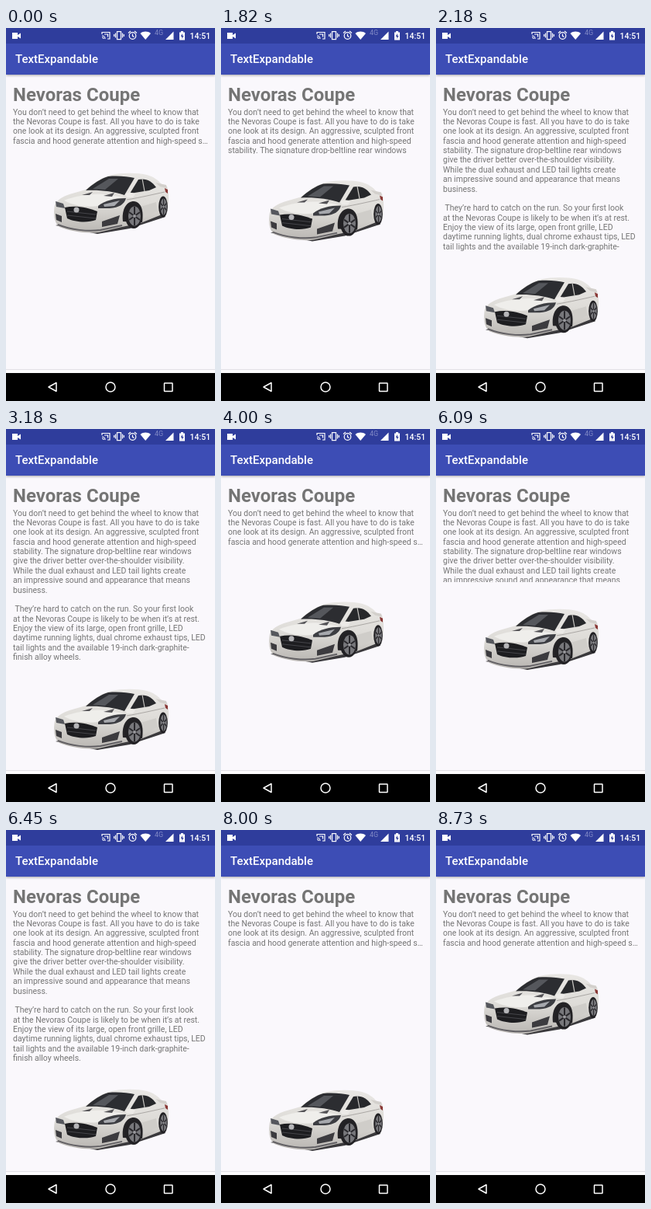
An HTML page for the animation above (8.82 s loop, 270 by 480 pixels).

```html
<!DOCTYPE html>
<html lang="en">
<head>
<meta charset="utf-8">
<title>TextExpandable</title>
<style>
@property --h {
  syntax: '<length>';
  inherits: true;
  initial-value: 50.5px;
}
html, body { margin: 0; width: 100%; height: 100%; overflow: hidden; }
body { background: #faf8fc; font-family: Roboto, sans-serif; }
#stage {
  position: relative; width: 270px; height: 480px; overflow: hidden;
  background: #faf8fc;
  animation: expand 8820ms cubic-bezier(.65, 0, .35, 1) infinite;
}
#stage > * { position: absolute; }
.bar { left: 0; top: 20px; width: 270px; height: 40px; background: #3d4db5; box-shadow: 0 1px 3px rgba(0, 0, 0, .35); }
.status { left: 0; top: 0; width: 270px; height: 20px; background: #2f3d9c; }
.app { left: 12px; top: 31px; color: #fff; font: 500 15px/18px Roboto, sans-serif; white-space: nowrap; }
h1 { margin: 0; left: 9px; top: 72px; color: #757575; font: 700 24px/28px Roboto, sans-serif; white-space: nowrap; }
.clip { left: 9px; top: 102px; width: 255px; height: var(--h); overflow: hidden; }
.clip pre {
  position: absolute; left: 0; top: .5px; margin: 0; color: #757575;
  font: 400 10.5px/12.37px Roboto, sans-serif;
}
.short { animation: short 8820ms step-end infinite; }
.full { animation: full 8820ms step-end infinite; }
.car { left: 0; top: 0; transform: translateY(calc(var(--h) - 50.5px)); }
.foot { left: 0; top: 439px; width: 270px; height: 5px; background: #fdfcfe; border-top: 1px solid #e3e1e6; box-sizing: border-box; }
.nav { left: 0; top: 444px; width: 270px; height: 36px; background: #000; }
.icons { left: 0; top: 0; }

/* 1640-2390 open, 3550-4300 close, 5770-6520 open, 8000-8750 close */
@keyframes expand {
  0%, 18.594% { --h: 50.5px; }
  27.098%, 40.249% { --h: 198.5px; }
  48.753%, 65.42% { --h: 49px; }
  73.923%, 90.703% { --h: 198.5px; }
  99.206%, 100% { --h: 49px; }
}
@keyframes short {
  0%, 40.249%, 90.703%, 100% { visibility: visible; }
  17.574%, 64.399% { visibility: hidden; }
}
@keyframes full {
  0%, 40.249%, 90.703%, 100% { visibility: hidden; }
  17.574%, 64.399% { visibility: visible; }
}
</style>
</head>
<body>
<div id="stage">
  <h1>Nevoras Coupe</h1>
  <div class="clip">
<pre class="short">You don’t need to get behind the wheel to know that
the Nevoras Coupe is fast. All you have to do is take
one look at its design. An aggressive, sculpted front
fascia and hood generate attention and high-speed s…</pre>
<pre class="full">You don’t need to get behind the wheel to know that
the Nevoras Coupe is fast. All you have to do is take
one look at its design. An aggressive, sculpted front
fascia and hood generate attention and high-speed
stability. The signature drop-beltline rear windows
give the driver better over-the-shoulder visibility.
While the dual exhaust and LED tail lights create
an impressive sound and appearance that means
business.

 They’re hard to catch on the run. So your first look
at the Nevoras Coupe is likely to be when it’s at rest.
Enjoy the view of its large, open front grille, LED
daytime running lights, dual chrome exhaust tips, LED
tail lights and the available 19-inch dark-graphite-
finish alloy wheels.</pre>
  </div>

  <svg class="car" width="270" height="300" viewBox="0 0 270 300">
    <defs>
      <linearGradient id="paint" x1="0" y1="0" x2="0" y2="1">
        <stop offset="0" stop-color="#e9e7e4"/>
        <stop offset=".5" stop-color="#dedcd8"/>
        <stop offset="1" stop-color="#b9b6b2"/>
      </linearGradient>
      <g id="wheel">
        <ellipse rx="11" ry="16" fill="#222124"/>
        <ellipse cx="1" rx="8" ry="12.5" fill="#77777b"/>
        <path d="M1-12V12M-6-5L8 5M-6 5L8-5" stroke="#29282c" stroke-width="2"/>
        <circle cx="1" r="2" fill="#99999d"/>
      </g>
    </defs>
    <path d="M64 254L118 265L160 258L206 243L200 236L100 245Z" fill="#3a393c"/>
    <path d="M63 228C66 221 73 217 82 214L103 208C114 199 124 192 136 189C150 186 170 186 182 189C190 191 197 196 201 201L208 204C211 213 211 226 207 236L199 241L174 251L150 256L120 263C102 265 82 261 69 256C62 251 61 238 63 228Z" fill="url(#paint)"/>
    <path d="M103 209C113 200 122 194 132 191C145 190 157 191 166 193L153 215C138 210 120 208 103 209Z" fill="#2c2d31"/>
    <path d="M112 207L133 194L145 194L128 208Z" fill="#55575c"/>
    <path d="M160 213L171 195C181 193 188 197 194 205L185 209Z" fill="#27282b"/>
    <path d="M176 194L179 210" stroke="#c9c7c3" stroke-width="1.2"/>
    <path d="M75 222C90 216 108 213 126 214L153 218C140 219 126 222 119 229C104 231 88 229 75 222Z" fill="#efeeeb"/>
    <path d="M98 215L112 211L108 215ZM126 216L140 212L137 217Z" fill="#535256"/>
    <path d="M156 221C174 218 191 214 205 211" fill="none" stroke="#aaa7a4"/>
    <path d="M174 230L194 224L195 236L176 245Z" fill="#cfcdc9"/>
    <path d="M154 214C157 211 164 211 167 214L164 218H156Z" fill="#eceae7"/>
    <path d="M64 223L74 226L76 232L65 230Z" fill="#55575d"/>
    <path d="M119 229C128 222 140 219 155 219C153 227 146 231 134 232L119 232Z" fill="#3c3d42"/>
    <path d="M126 227L147 222L140 229L127 230Z" fill="#a6a8ad"/>
    <path d="M76 231C90 228 106 231 118 236L116 247C106 251 89 250 79 245Z" fill="#1d1d20"/>
    <path d="M79 236L116 240M79 241L116 245" stroke="#45454a"/>
    <circle cx="91" cy="234" r="3.5" fill="#b5b5b8"/>
    <path d="M64 239L72 242L72 250L65 247ZM124 249L147 241L144 252L124 256Z" fill="#3c3b3f"/>
    <path d="M67 253C84 260 106 262 122 260L150 254" fill="none" stroke="#626064" stroke-width="2"/>
    <path d="M151 249C149 233 156 223 165 223C175 224 178 235 176 250Z" fill="#242326"/>
    <use href="#wheel" transform="translate(165 242)"/>
    <use href="#wheel" transform="translate(203 230) scale(.53 .85)"/>
    <path d="M193 199L207 202L208 206L199 204Z" fill="#d3d0cc"/>
    <path d="M205 206L209 208L209 213L206 211Z" fill="#8a3937"/>
  </svg>

  <div class="bar"></div>
  <div class="status"></div>
  <div class="app">TextExpandable</div>
  <div class="foot"></div>
  <div class="nav"></div>

  <svg class="icons" width="270" height="480" viewBox="0 0 270 480" fill="#fff">
    <path d="M8 6H15V9L19 6.5V13.5L15 11V14H8Z"/>
    <g fill="none" stroke="#fff" stroke-width="1.2">
      <path d="M124 8V5.500H134V14H131"/>
      <path d="M124 10A4 4 0 0 1 128 14M124 12A2 2 0 0 1 126 14"/>
      <path d="M127 8H131.500V11.500"/>
      <rect x="143.500" y="4.600" width="5" height="10"/>
      <path d="M141.500 6.500V12.500M150.500 6.500V12.500M139.700 8V11M152.300 8V11"/>
      <circle cx="163.500" cy="10" r="4.300"/>
      <path d="M163.500 7.500V10.300L165.500 11.500M158 6.500L161 4M169 6.500L166 4"/>
    </g>
    <path d="M173.500 7C177.500 3.800 183 3.800 187 7L180.200 15Z"/>
    <text x="192" y="9" font-family="Roboto, sans-serif" font-size="9" fill="#8089c6">4G</text>
    <path d="M206 15L216.500 4.500V15Z"/>
    <path d="M224 5.500H226V4H229V5.500H231V15.500H224Z"/>
    <path d="M228 7L225.700 11H227.300V14L229.500 10H228Z" fill="#2f3d9c"/>
    <text x="237.500" y="13.500" font-family="Roboto, sans-serif" font-size="10.500" font-weight="500">14:51</text>
    <g fill="none" stroke="#fff" stroke-width="1.500" stroke-linejoin="round">
      <path d="M65 456.500V467.500L55 462Z"/>
      <circle cx="135" cy="462" r="6"/>
      <rect x="204.500" y="457" width="10.500" height="10.500" rx=".5"/>
    </g>
  </svg>
</div>
</body>
</html>
```
